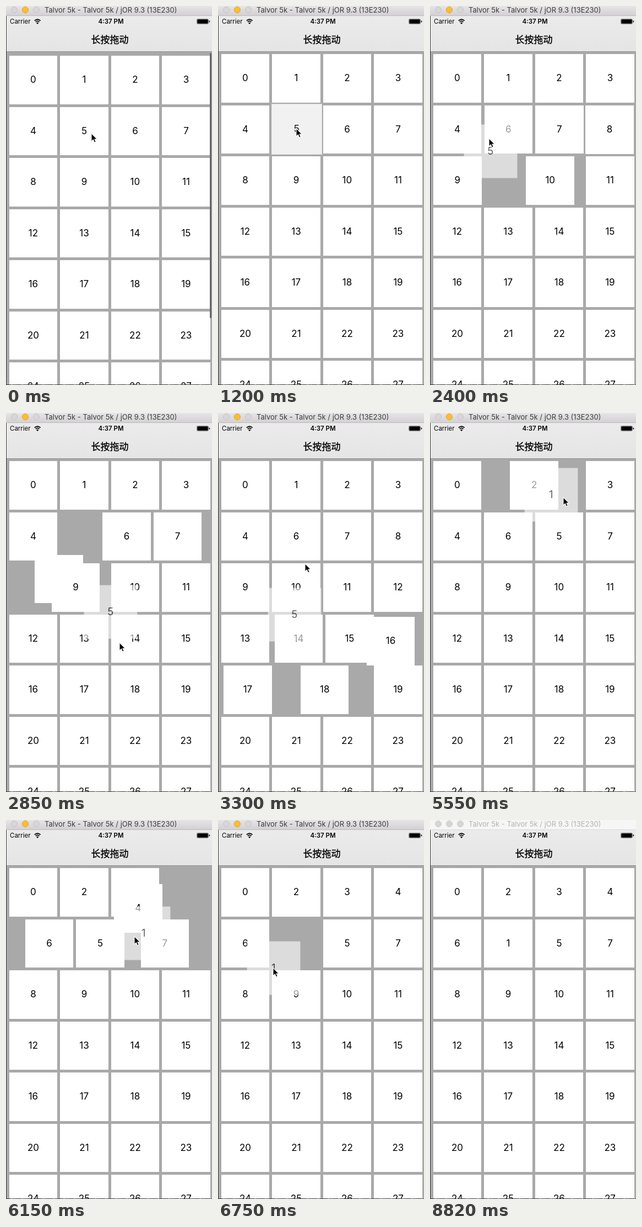
An HTML page that plays this animation: 374 px wide and 686 px high, repeating every 8860 ms.

```html
<!DOCTYPE html>
<html lang="zh">
<head>
<meta charset="utf-8">
<title>长按拖动</title>
<style>
html, body { margin: 0; width: 100%; height: 100%; overflow: hidden; }
#stage { position: relative; width: 374px; height: 686px; overflow: hidden; background: #a9a9a9;
  font-family: Inter, Roboto, "Liberation Sans", sans-serif; color: #000; }
#stage * { position: absolute; box-sizing: border-box; white-space: nowrap; }
.cell { width: 87.5px; height: 87.5px; background: #fff;
  font-size: 17px; line-height: 87.5px; text-align: center; }
#grid { inset: 0; }
#bar { left: 370px; top: 85px; width: 3px; height: 480px; border-radius: 2px; background: #666; }
#head { left: 0; top: 18px; width: 374px; height: 65px; border-bottom: 1px solid #8f8f8f;
  background: linear-gradient(#ebebeb, #e5e5e5); }
#win { left: 0; top: 0; width: 374px; height: 18px; border-bottom: 1px solid #bcbabc;
  background: linear-gradient(#e6e4e6, #d3d1d3); color: #3c3c3c; }
#win.off { background: #f6f6f6; border-color: #dadada; color: #b2b2b2; }
#win i { top: 1px; width: 12px; height: 12px; border-radius: 6px; background: #d9d6d9; border: 1px solid #c5c2c5; }
#win i.on { background: #fdbd2f; border-color: #e0a028; }
#win.off i { background: #d6d6d6; border-color: #cbcbcb; }
#name { left: 70px; top: -1px; font-size: 13px; line-height: 16px; }
#carrier { left: 7px; top: 21px; font-size: 11.5px; line-height: 15px; }
#clock { left: 90px; width: 201px; top: 21px; text-align: center; font-size: 11.5px; font-weight: 600; line-height: 15px; }
#nav { left: 88px; width: 201px; top: 48px; text-align: center; -webkit-text-stroke: .35px #000;
  font: 400 17px/24px "Noto Sans CJK SC", "Noto Sans CJK", sans-serif; }
#edge { left: 0; top: 18px; width: 1px; height: 668px; background: #39343a; }
#foot { left: 0; top: 685px; width: 374px; height: 1px; background: repeating-linear-gradient(90deg, #333 0 9px, #777 9px 12px, #444 12px 19px); }
svg { overflow: visible; }
</style>
</head>
<body>
<div id="stage">
  <div id="grid"></div>
  <div id="bar"></div>
  <div id="head"></div>
  <span id="carrier">Carrier</span>
  <svg style="left:51px;top:23px" width="12" height="10" fill="none" stroke="#000" stroke-width="1.7">
    <path d="M.8 3.7Q6.2-1.2 11.6 3.7M2.8 6Q6.2 2.8 9.6 6"/>
    <path d="M6.2 9.9L4.1 7.7Q6.2 5.9 8.3 7.7Z" fill="#000" stroke="none"/>
  </svg>
  <span id="clock">4:37 PM</span>
  <svg style="left:346px;top:23px" width="25" height="11">
    <rect x=".5" y=".5" width="21" height="9" rx="1.8" fill="none" stroke="#444" stroke-width=".6"/>
    <rect x="1.3" y="1.3" width="19.4" height="7.4" rx="1"/>
    <path d="M22.6 3.2Q24.4 3.4 24.4 5T22.6 6.8Z"/>
  </svg>
  <span id="nav">长按拖动</span>
  <div id="win">
    <i style="left:9px"></i><i class="on" style="left:29px"></i><i style="left:49px"></i>
    <span id="name">Talvor 5k - Talvor 5k / jOR 9.3 (13E230)</span>
  </div>
  <div id="edge"></div>
  <div id="foot"></div>
  <svg id="cursor" width="12" height="18">
    <path d="M-1-.5V14.1L2.4 11L4.6 16.1L7.2 15L5 10H9.6Z" stroke="#fff" stroke-width="1.1"/>
  </svg>
</div>
<script>
const LOOP = 8860, STEP = 150, EASE = 300, LAG = 50;
const COUNT = 28, PITCH = 92.5, SIZE = 87.5, LEFT = 5.7, TOP = 87.2;
const $ = id => document.getElementById(id);

// Pointer route: time, x, y. The lifted cell and all reordering follow from it.
const route = [
  [0, 156, 231], [450, 143, 222],
  [1550, 143, 222], [2050, 220, 317], [2250, 140, 322], [2350, 110, 263], [2400, 108, 240],
  [2500, 112, 195], [2650, 140, 189], [2950, 240, 530], [3200, 145, 472], [3250, 139, 365],
  [3300, 159, 273], [3450, 185, 275], [3700, 234, 200], [4200, 150, 150],
  [5150, 150, 150], [5350, 188, 148], [5500, 219.5, 148], [5550, 243, 153], [5800, 310, 155],
  [5950, 295, 185], [6550, 113, 262], [6700, 101, 268],
  [7100, 101, 268], [7950, 239, 402]
];
const drags = [
  { cell: 5, grab: 1070, drop: 3790 },
  { cell: 1, grab: 4820, drop: 6950 }
];

const mix = (a, b, f) => a + (b - a) * f;
const ease = s => { s = Math.min(1, Math.max(0, s)); return s * s * (3 - 2 * s); };
const slotX = n => LEFT + PITCH * (n % 4);
const slotY = n => TOP + PITCH * Math.floor(n / 4);

function pointer(t) {
  const i = route.findIndex(k => k[0] > t);
  if (i < 0) return route[route.length - 1].slice(1);
  const [a, b] = [route[i - 1], route[i]], f = (t - a[0]) / (b[0] - a[0]);
  return [mix(a[1], b[1], f), mix(a[2], b[2], f)];
}

// Top left corner of a cell centred on the delayed pointer
const follow = t => pointer(t - LAG).map(v => v - SIZE / 2);

function slotUnder(t) {
  const [x, y] = follow(t);
  return Math.round((x - LEFT) / PITCH) + 4 * Math.round((y - TOP) / PITCH);
}

function addCell(text) {
  const el = document.createElement("div");
  el.className = "cell";
  el.textContent = text;
  $("grid").append(el);
  return el;
}
const cells = Array.from({ length: COUNT }, (_, i) => addCell(i));
const ghost = addCell("");

// Each time the lifted cell enters a new slot, every displaced cell gets an eased shift
const shifts = cells.map(() => []);
let order = cells.map((_, i) => i);
for (const { cell, grab, drop } of drags) {
  for (let t = grab; t < drop; t += 2) {
    const from = order.indexOf(cell), to = slotUnder(t);
    if (from === to) continue;
    const next = order.slice();
    next.splice(to, 0, next.splice(from, 1)[0]);
    next.forEach((v, slot) => {
      const old = order.indexOf(v);
      if (old !== slot) shifts[v].push([t, slotX(slot) - slotX(old), slotY(slot) - slotY(old)]);
    });
    order = next;
  }
}

function cellAt(i, t) {
  let x = slotX(i), y = slotY(i);
  for (const [time, dx, dy] of shifts[i]) {
    const e = ease((t - time) / EASE);
    x += dx * e;
    y += dy * e;
  }
  return [x, y];
}

function place(el, [x, y]) {
  el.style.left = x + "px";
  el.style.top = y + "px";
}
const show = (el, on) => { el.style.visibility = on ? "visible" : "hidden"; };

function draw(now) {
  const t = Math.floor(now / STEP) * STEP;
  const pull = 1 - ease(t / 450);
  const held = drags.find(d => t > d.grab && t < d.drop + EASE);

  cells.forEach((el, i) => {
    const [x, y] = cellAt(i, t);
    place(el, [x, y + 3 * pull]);
    show(el, !held || held.cell !== i);
  });

  show(ghost, held);
  if (held) {
    const up = ease((t - held.grab) / EASE) - ease((t - held.drop) / EASE);
    const home = cellAt(held.cell, t), hand = follow(t);
    ghost.textContent = held.cell;
    ghost.style.opacity = 1 - .4 * up;
    ghost.style.transform = `scale(${1 + .1 * up})`;
    place(ghost, home.map((v, n) => mix(v, hand[n], up)));
  }

  place($("cursor"), pointer(t));
  show($("cursor"), t < 8100);
  $("bar").style.opacity = pull;
  $("win").className = now >= 8820 ? "off" : "";
}

const start = performance.now();
function tick() {
  draw((performance.now() - start) % LOOP);
  requestAnimationFrame(tick);
}
tick();
</script>
</body>
</html>
```
